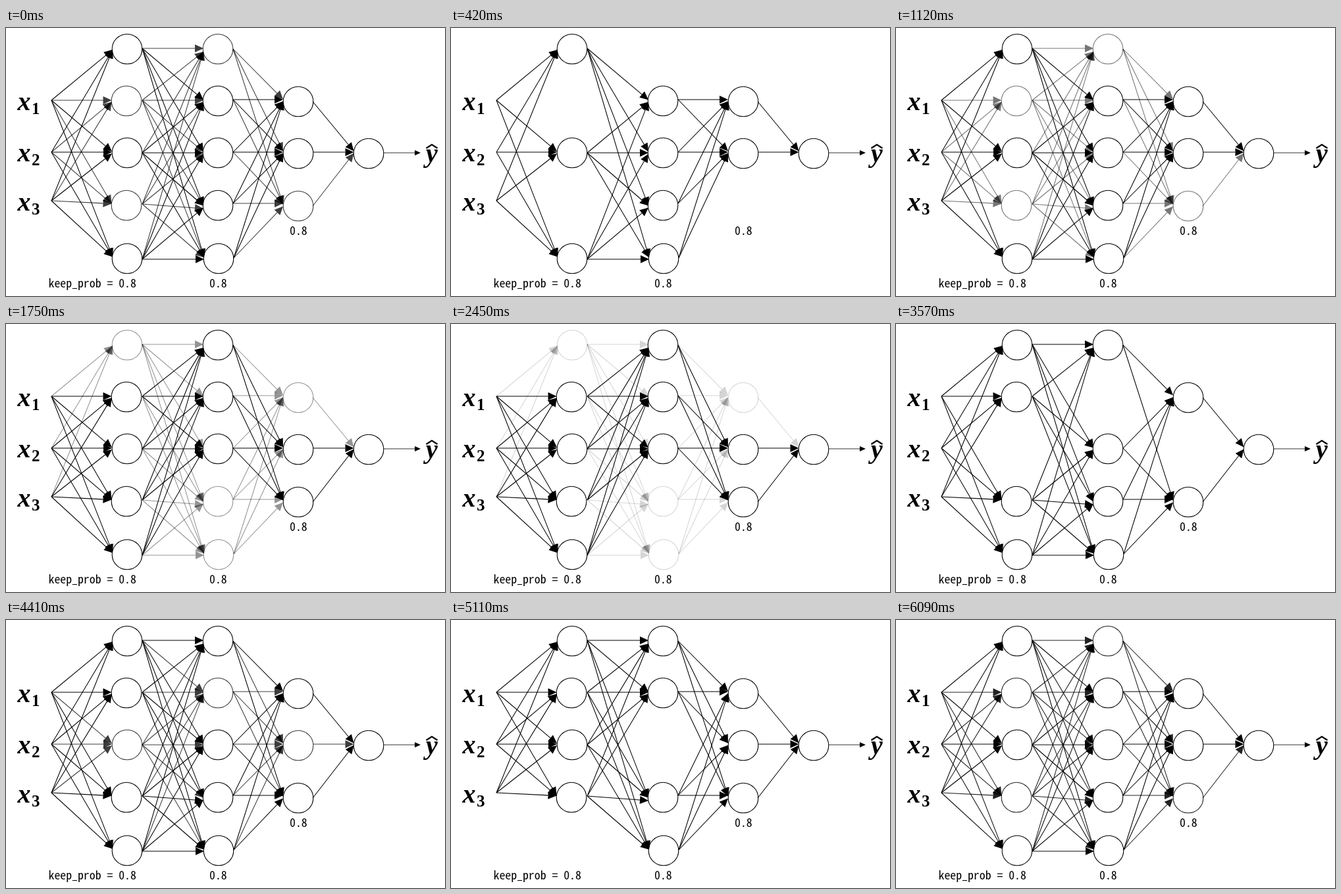
An HTML page with a canvas for the animation above (6160 ms loop, 667 by 408 pixels).

```html
<!DOCTYPE html>
<html lang="en">
<head>
<meta charset="utf-8">
<title>Dropout</title>
<style>
html, body { margin: 0; width: 100%; height: 100%; overflow: hidden; background: #fff; }
canvas { display: block; width: 667px; height: 408px; }
</style>
</head>
<body>
<canvas id="stage" width="667" height="408"></canvas>
<script>
const ctx = document.getElementById('stage').getContext('2d');
const LOOP = 6160, STEP = 70, FADE = 8.3, RADIUS = 22.8;

// Each layer: circle centres, where lines leave and where arrows land.
const layers = [
  { out: [[69, 110], [69, 189], [69, 263]] },
  {
    nodes: [[184, 32], [183, 111], [184, 190], [183, 270], [184, 351]],
    in: [[162, 33], [160.5, 111], [161, 189.5], [160.5, 269], [162, 350]],
    out: [[207, 31], [207, 110], [207, 190], [207, 268], [207, 352]]
  },
  {
    nodes: [[322, 32], [322, 111], [322, 190], [322, 270], [323, 351]],
    in: [[300, 36], [300, 111], [300, 190], [300, 272], [301, 351]],
    out: [[345, 32], [345, 109], [345, 189], [345, 267], [346, 350]]
  },
  {
    nodes: [[444, 112], [444, 191], [444, 271]],
    in: [[421, 110], [421, 189], [421, 270]],
    out: [[466, 112], [467, 189], [466, 271]]
  },
  { nodes: [[551, 191]], in: [[528.5, 189]] }
];

// gone: end of fade-out, back: first visible step; drop: "layer:node" keys.
const rounds = [
  { gone: 420, back: 910, drop: ['1:1', '1:3', '2:0', '3:2'] },
  { gone: 1960, back: 2450, drop: ['1:0', '2:3', '2:4', '3:0'] },
  { gone: 3570, back: 4060, drop: ['1:2', '2:1', '3:1'] },
  { gone: 5110, back: 5600, drop: ['1:4', '2:2'] }
];

const curve = k => Math.pow(Math.min(1, Math.max(0, k / FADE)), 0.85);

function roundAlpha(r, t) {
  if (t > r.back + LOOP / 2) t -= LOOP;
  return t < r.gone ? curve((r.gone - t) / STEP) : curve((t - r.back) / STEP + 1);
}

function arrow([x1, y1], [x2, y2], len = 13, half = 6, width = 1.05) {
  const a = Math.atan2(y2 - y1, x2 - x1), c = Math.cos(a), s = Math.sin(a);
  const bx = x2 - len * c, by = y2 - len * s;
  ctx.lineWidth = width;
  ctx.beginPath();
  ctx.moveTo(x1, y1);
  ctx.lineTo(bx, by);
  ctx.stroke();
  ctx.beginPath();
  ctx.moveTo(x2, y2);
  ctx.lineTo(bx - half * s, by + half * c);
  ctx.lineTo(bx + half * s, by - half * c);
  ctx.fill();
}

// Level arrows stay level; steep ones land a little above or below centre.
function landing(layer, j, from) {
  const [x, y] = layers[layer].in[j];
  const dy = y - from[1];
  if (Math.abs(dy) < 6) return layer === 2 && j === 3 ? [x, 275] : [x, from[1]];
  return [x, y - Math.sign(dy) * (j === 0 && layer < 3 ? 0 : 1.5)];
}

function text(str, x, y, font) {
  ctx.font = font;
  ctx.fillText(str, x, y);
}

function labels() {
  const mono = '17.8px "Noto Sans Mono CJK KR", "Noto Sans Mono CJK JP", "Noto Sans Mono CJK SC", "Noto Sans CJK KR", monospace';
  const serif = '"Liberation Serif", "Times New Roman", serif';
  text('keep_prob = 0.8', 64.5, 395, mono);
  text('0.8', 309, 395, mono);
  text('0.8', 431, 315, mono);
  [125, 203, 278].forEach((y, i) => {
    text('x', 17.5, y, 'italic bold 40px ' + serif);
    text(String(i + 1), 39, y + 6, 'bold 25px ' + serif);
  });
  text('y', 638, 204, 'italic bold 40px ' + serif);
  ctx.lineWidth = 2.2;
  ctx.beginPath();
  ctx.moveTo(638.5, 183);
  ctx.lineTo(647, 177.5);
  ctx.lineTo(655.5, 183);
  ctx.stroke();
}

function draw(time) {
  const t = Math.floor((time % LOOP) / STEP) * STEP;
  const fade = {};
  for (const r of rounds) {
    const a = roundAlpha(r, t);
    for (const key of r.drop) fade[key] = Math.min(a, fade[key] ?? 1);
  }
  const alpha = (layer, j) => fade[layer + ':' + j] ?? 1;

  ctx.globalAlpha = 1;
  ctx.fillStyle = '#fff';
  ctx.fillRect(0, 0, 667, 408);
  ctx.fillStyle = ctx.strokeStyle = '#000';

  for (let n = 1; n < layers.length; n++) {
    layers[n - 1].out.forEach((from, i) => {
      layers[n].nodes.forEach((_, j) => {
        ctx.globalAlpha = Math.min(alpha(n - 1, i), alpha(n, j));
        if (ctx.globalAlpha > 0) arrow(from, landing(n, j, from));
      });
    });
    layers[n].nodes.forEach(([x, y], j) => {
      ctx.globalAlpha = alpha(n, j);
      ctx.lineWidth = 1.1;
      ctx.beginPath();
      ctx.arc(x, y, RADIUS, 0, 2 * Math.PI);
      ctx.stroke();
    });
  }

  ctx.globalAlpha = 1;
  arrow([574, 190], [630, 190], 9, 4, 0.8);
  labels();
}

const start = performance.now();
function tick() {
  draw(performance.now() - start);
  requestAnimationFrame(tick);
}
tick();
</script>
</body>
</html>
```
